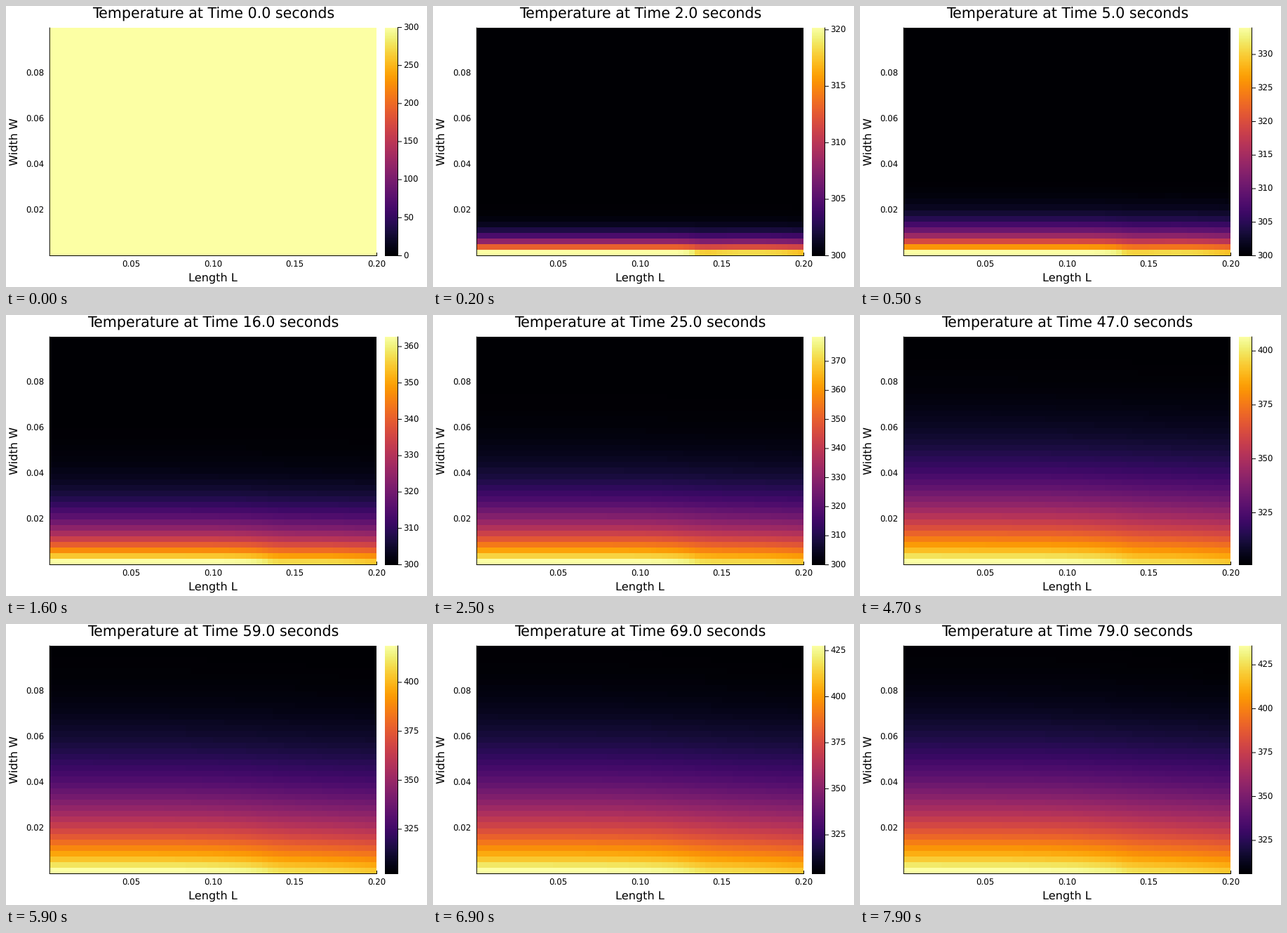
Write a matplotlib script that moves like this. It is 600 px wide and 400 px high and loops after 8000 ms.

```python
import math
import numpy as np
import matplotlib.pyplot as plt
from matplotlib.animation import FuncAnimation

W, H, FRAMES = 600, 400, 80
LEFT, RIGHT, TOP, BOTTOM = 62, 528, 30.6, 355.6
NX, NY = 60, 40
ALPHA = 1.64e-5      # diffusivity of the plate, m^2/s
BASE_LOSS = 3.0      # cooling through the heated bottom, 1/m
EDGE_LOSS = 1.0      # cooling through the right edge, 1/m
PT = 1.4714          # pixels per point of text

plt.rcParams["font.family"] = "DejaVu Sans"
plt.rcParams["text.hinting"] = "no_hinting"


def solve():
    """Plate heated from below: one field of temperature rise per second."""
    dx, dy, dt = 0.2 / NX, 0.1 / NY, 0.05
    x = (np.arange(NX) + 0.5) / NX
    # full heating on the left two thirds, a weaker hump on the rest
    hump = np.sqrt(np.sin(np.pi * np.clip(3 * x - 2, 0, 1)))
    flux = np.where(x < 2 / 3, 1.0, 0.82 + 0.09 * hump)
    u = np.zeros((NY, NX))
    fields = [u.copy()]
    for _ in range(FRAMES - 1):
        for _ in range(round(1 / dt)):
            p = np.pad(u, 1, mode="edge")
            p[:, -1] *= 1 - EDGE_LOSS * dx
            p[0] *= 1 - BASE_LOSS * dy
            lap = ((p[1:-1, 2:] + p[1:-1, :-2] - 2 * u) / dx**2
                   + (p[2:, 1:-1] + p[:-2, 1:-1] - 2 * u) / dy**2)
            u = u + ALPHA * dt * lap
            u[0] += ALPHA * dt / dy * flux
        fields.append(u.copy())
    return fields


def peak_rise(t):
    return 17.54 * math.sqrt(t) - 4.2 - 0.198 * t


def bar_ticks(lo, hi):
    """Largest round step that gives five to nine ticks, else at least four."""
    slack = 1e-3 * (hi - lo)
    options = []
    for step in (100, 50, 25, 10, 5, 2.5, 1):
        first = math.ceil((lo - slack) / step)
        last = math.floor((hi + slack) / step)
        options.append([k * step for k in range(first, last + 1)])
    for least in (5, 4):
        for ticks in options:
            if least <= len(ticks) <= 9:
                return ticks
    return []


fields = solve()

fig = plt.figure(figsize=(W / 100, H / 100), dpi=100, facecolor="white")
ax = fig.add_axes([0, 0, 1, 1])
ax.axis("off")


def label(x, y, s, pt, **kw):
    kw = {"ha": "center", "va": "baseline", **kw}
    return ax.text(x, y, s, fontsize=pt * PT * 0.72, color="black", **kw)


def line(xs, ys):
    return ax.plot(xs, ys, color="black", lw=0.72, snap=False,
                   solid_capstyle="butt")[0]


def mesh(left, right, values):
    rows, cols = values.shape
    return ax.pcolormesh(np.linspace(left, right, cols + 1),
                         np.linspace(BOTTOM, TOP, rows + 1), values,
                         cmap="inferno", vmin=0, vmax=1)


heat = mesh(LEFT, RIGHT, fields[0])
mesh(540, 558, np.linspace(0, 1, 256)[:, None])
ax.set_xlim(0, W)
ax.set_ylim(H, 0)

line([62.3, 62.3], [TOP, 356])
line([62, 529], [355.5, 355.5])
line([528.5, 528.5], [351, 356])
line([558.5, 558.5], [TOP, 356])

title = label(295.5, 18, "", 14)
label(295, 392, "Length L", 11)
label(16.4, 193.3, "Width W", 11, rotation=90, rotation_mode="anchor")
for k in range(1, 5):
    label(LEFT + 116.5 * k, 371.5, f"{0.05 * k:.2f}", 8)
    label(54.4, 355.5 - 65 * k + 4.5, f"{0.02 * k:.2f}", 8, ha="right")

marks = [(line([558, 564], [0, 0]), label(566, 0, "", 8, ha="left"))
         for _ in range(10)]


def update(t):
    if t == 0:
        lo, hi = 0, 300
        heat.set_array(np.ones((NY, NX)))
    else:
        u = fields[t] / fields[t].max()
        lo, hi = 300 + peak_rise(t) * u.min(), 300 + peak_rise(t)
        heat.set_array((u - u.min()) / (1 - u.min()))
    title.set_text(f"Temperature at Time {t:.1f} seconds")

    ticks = bar_ticks(lo, hi)
    decimals = int(any(v % 1 for v in ticks))
    for i, (tick, text) in enumerate(marks):
        shown = i < len(ticks)
        tick.set_visible(shown)
        text.set_visible(shown)
        if shown:
            y = 355.5 - 325 * (ticks[i] - lo) / (hi - lo)
            tick.set_ydata([y, y])
            text.set_y(y + 4)
            text.set_text(f"{ticks[i]:.{decimals}f}")
    return []


anim = FuncAnimation(fig, update, frames=FRAMES, interval=100,
                     repeat=True, repeat_delay=0, blit=False)
plt.show()
```
